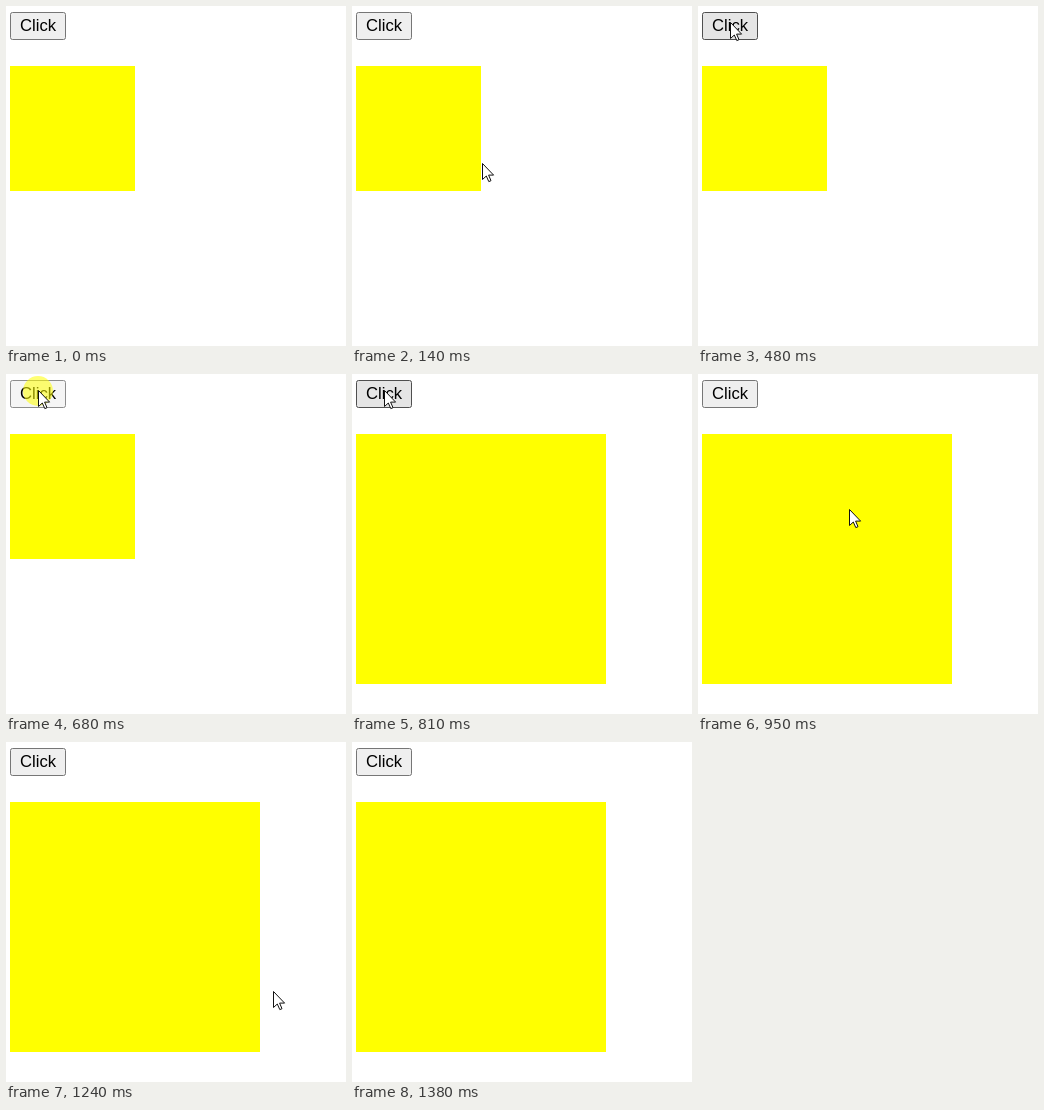
An HTML page that plays this animation: 340 by 340 pixels, repeating every 1840 ms.

```html
<!DOCTYPE html>
<html lang="en">
<head>
<meta charset="utf-8">
<title>Click to grow</title>
<style>
html, body { margin: 0; width: 100%; height: 100%; overflow: hidden; background: #fff; }
svg { display: block; width: 100vw; height: 100vh; }
text { font: 16.667px Arial, "Liberation Sans", sans-serif; text-anchor: middle; }
</style>
</head>
<body>
<svg viewBox="0 0 340 340">
  <rect width="340" height="340" fill="#fff"/>
  <rect id="box" x="4" y="60" width="125" height="125" fill="#ff0"/>
  <rect id="button" x="4.5" y="6.5" width="55" height="27" rx="2"/>
  <text x="32" y="25">Click</text>
  <circle id="halo" cx="32" cy="17" r="15" fill="#ff0" fill-opacity=".55"/>
  <path id="cursor" d="M.5 .5V16.5L4.3 13L6.8 18.6L9 17.7L6.6 12.1H11.6Z" fill="#fff" stroke="#111"/>
</svg>
<script>
const LOOP = 1840;
const $ = id => document.getElementById(id);
const box = $("box"), button = $("button"), halo = $("halo"), cursor = $("cursor");
const START = [200, 259], TARGET = [32, 16], REST = [269, 253];
const LOOKS = {
  idle: ["#efefef", "#767676"],
  hover: ["#e5e5e5", "#4f4f4f"],
  down: ["#f5f5f5", "#8d8d8d"]
};

const mix = (a, b, k) => a.map((v, i) => Math.round(v + (b[i] - v) * k));
const tick = (t, from) => Math.floor((t - from) / 70 + 1e-6) * 70;

function cursorAt(t) {
  if (t < 70 || t >= 1380) return null;
  if (t < 480) return mix(START, TARGET, 1 - Math.pow(1 - tick(t, 70) / 410, 2.9));
  if (t < 810) return TARGET;
  if (t < 1090) {
    const k = tick(t, 810) / 280;
    return mix(TARGET, REST, k * k * (3 - 2 * k));
  }
  if (t < 1240) return REST;
  return t < 1310 ? [267, 249] : [296, 284];
}

function draw(t) {
  const p = cursorAt(t);
  cursor.style.display = p ? "" : "none";
  if (p) cursor.setAttribute("transform", `translate(${p})`);

  const over = p && p[0] >= 4 && p[0] < 60 && p[1] >= 6 && p[1] < 34;
  const look = t >= 680 && t < 810 ? "down" : over ? "hover" : "idle";
  button.setAttribute("fill", LOOKS[look][0]);
  button.setAttribute("stroke", LOOKS[look][1]);

  halo.style.display = t >= 610 && t < 810 ? "" : "none";

  const size = t >= 810 ? 250 : 125;
  box.setAttribute("width", size);
  box.setAttribute("height", size);
}

const begin = performance.now();
function frame() {
  draw((performance.now() - begin) % LOOP);
  requestAnimationFrame(frame);
}
draw(0);
requestAnimationFrame(frame);
</script>
</body>
</html>
```
